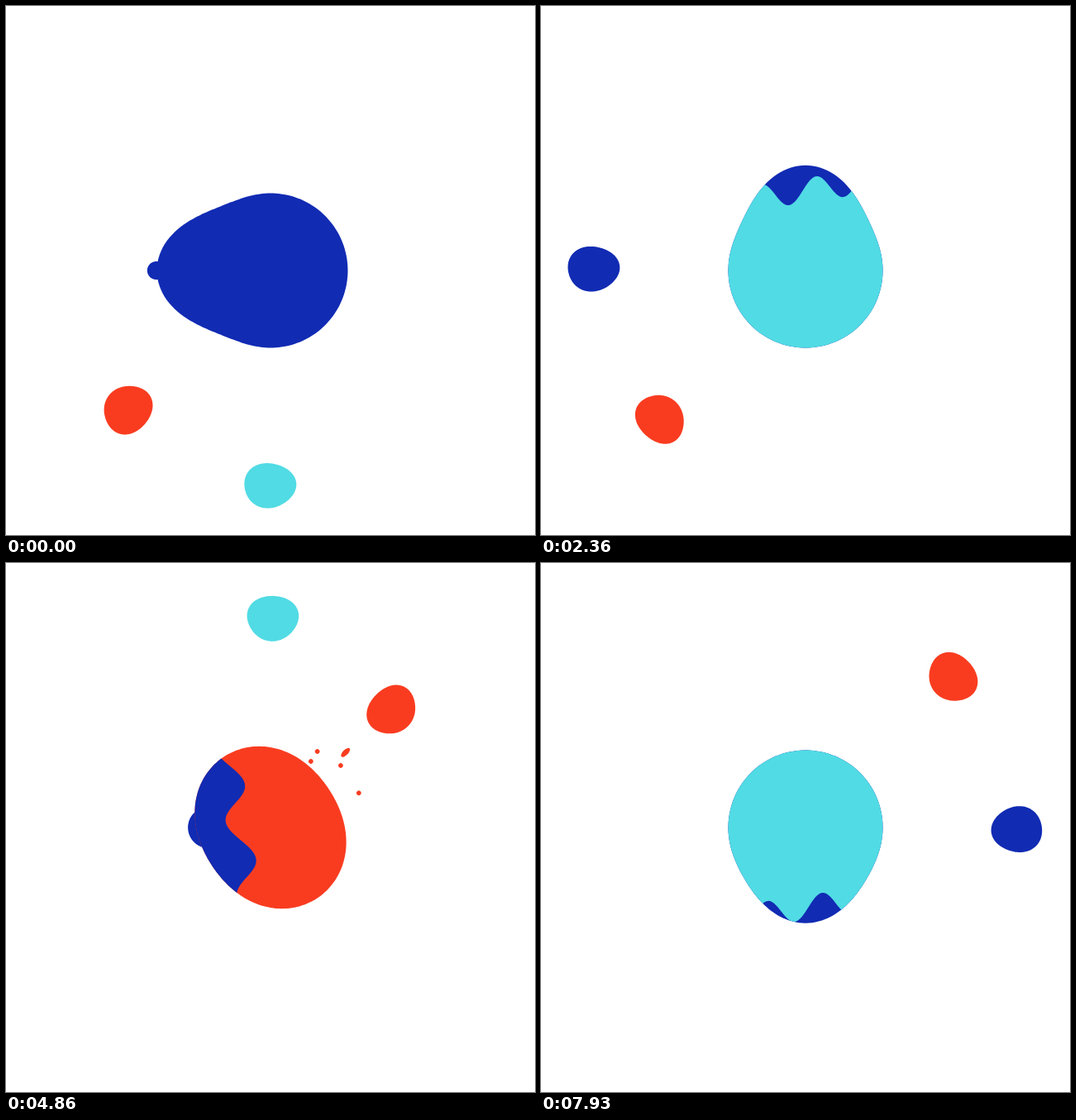
An HTML page with a canvas for the animation above (8 s loop, 640 by 640 pixels).

```html
<!DOCTYPE html>
<html lang="en">
<head>
<meta charset="utf-8">
<title>Drops</title>
<style>
  html, body { margin: 0; width: 100%; height: 100%; overflow: hidden; background: #fff; }
  canvas { display: block; width: 100%; height: 100%; }
</style>
</head>
<body>
<canvas id="stage" width="640" height="640"></canvas>
<script>
const ctx = document.getElementById('stage').getContext('2d');
const { PI, sin, cos, exp, max, min, floor } = Math;
const TAU = PI * 2;
const LOOP = 8000, RADIUS = 93.5;

// A drop crosses the body once per pass, in alternating directions.
// Ages are in ms since it reached the body.
const PASS = 5640, LEAD = 60, SUNK = 170, EXIT = 820, DETACH = 1200, RETURN = 4250, FILLED = 520;

const DROPS = [
  { color: '#51dbe4', arrive: 2000, angle: -PI / 2, sprayLead: 100 },
  { color: '#f93c20', arrive: 3430, angle: -PI / 4, sprayLead: 0 },
  { color: '#112bb3', arrive: 4820, angle: 0, sprayLead: 0 }
];

// Places of the small splashes, along and across the path.
const SPLASHES = [[105, -25], [91, -22], [113, 7], [105, 46], [76, 19]];

const mix = (a, b, x) => a + (b - a) * x;
const clamp = x => max(0, min(1, x));

function smooth(from, to, t) {
  const x = clamp((t - from) / (to - from));
  return x * x * (3 - 2 * x);
}

// Sinks in steadily, is thrown out and slows down, drifts back and snaps in.
function distance(age) {
  if (age < SUNK) return -88 + 0.32 * age;
  const back = clamp((age - RETURN) / (PASS - RETURN));
  return 264 - 126 * exp((EXIT - age) / 820) - 95 * back ** 1.45 - 80 * back ** 8;
}

function dropShape(age) {
  if (age < SUNK) return { size: 25, stretch: 0, lobes: 0, turn: 0, sway: 0 };
  const free = smooth(1100, 1400, age) * (1 - smooth(5100, 5580, age));
  const turn = PI / 2 - PI * clamp((age - 1400) / 3390) ** 2.3;
  return {
    size: mix(11, 29.3, smooth(EXIT, 1150, age)) - 4 * smooth(5000, 5580, age),
    stretch: 2.2 * free * cos((age - 1430) / 900 * TAU),
    lobes: 0.032 * free,
    turn,
    sway: 3 * free * sin(turn)
  };
}

const bulge = age => 44 * smooth(100, 480, age) * (1 - smooth(1000, 1350, age));
const squash = age => 9 * smooth(950, 1400, age) * (1 - smooth(1500, 2000, age));

function stateAt(drop, time) {
  const pass = floor((time - drop.arrive + LEAD) / PASS);
  return {
    ...drop,
    age: time - drop.arrive - pass * PASS,
    heading: drop.angle + (pass % 2 ? PI : 0)
  };
}

// Draws with x along the drop's path and y across it.
function along(drop, ...parts) {
  ctx.save();
  ctx.rotate(drop.heading);
  ctx.fillStyle = drop.color;
  parts.forEach(draw => draw(drop));
  ctx.restore();
}

function fillOutline(pointAt) {
  ctx.beginPath();
  for (let i = 0; i < 180; i++) ctx.lineTo(...pointAt(i / 180 * TAU));
  ctx.closePath();
  ctx.fill();
}

function fillOval(x, y, rx, ry) {
  ctx.beginPath();
  ctx.ellipse(x, y, rx, ry, 0, 0, TAU);
  ctx.fill();
}

function drawSpray({ age, sprayLead }) {
  const t = age + sprayLead - 1430;
  if (t < -230 || t > 650) return;
  const slowing = exp(-t / 140);
  const tail = 7 * (1 - smooth(100, 700, t));
  fillOval(165 - 37 * slowing, 0, tail, tail * 0.45);
  for (const [x, y] of SPLASHES) {
    const r = 2.8 * clamp(1 - t / (17 * (125 - x)));
    fillOval(x + 16 * (1 - slowing), y, r, r);
  }
}

function drawNeck({ age }) {
  if (age < EXIT || age > DETACH) return;
  const x = distance(age), y = dropShape(age).size * 0.8;
  const waist = 14 * (DETACH - age) / (DETACH - EXIT), middle = x / 2 + 50;
  ctx.beginPath();
  ctx.moveTo(75, -30);
  ctx.quadraticCurveTo(middle, -waist, x, -y);
  ctx.lineTo(x, y);
  ctx.quadraticCurveTo(middle, waist, 75, 30);
  ctx.fill();
}

function drawDrop({ age }) {
  if (age > SUNK && age < EXIT - 40) return;
  const { size, stretch, lobes, turn, sway } = dropShape(age);
  const x = distance(age);
  fillOutline(a => {
    const k = 1 + lobes * cos(3 * (a - turn));
    return [x + (size + stretch) * k * cos(a), sway + (size - stretch) * k * sin(a)];
  });
}

function drawBody(drops) {
  const [latest, previous] = [...drops].sort((a, b) => a.age - b.age);
  const filling = latest.age < FILLED;
  const radius = a => drops.reduce((r, { age, heading }) => {
    const b = a - heading;
    return r + bulge(age) * max(0, cos(b)) ** 4.5 - squash(age) * cos(2 * b - 0.4);
  }, RADIUS);
  ctx.save();
  ctx.fillStyle = filling ? previous.color : latest.color;
  fillOutline(a => [radius(a) * cos(a), radius(a) * sin(a)]);
  if (filling) {
    ctx.clip();
    along(latest, drawFront);
  }
  ctx.restore();
}

// The wavy edge of the new colour: rushes across, waits near the tip, then fills it.
function drawFront({ age }) {
  const edge = min(97, -73 + 0.85 * age) + 80 * smooth(380, FILLED, age);
  const height = 15 * smooth(0, 40, age), settled = smooth(40, 290, age);
  const wave = mix(90, 66, settled), shift = mix(38, 13, settled);
  ctx.beginPath();
  ctx.moveTo(-200, -150);
  for (let y = -150; y <= 150; y += 2) {
    ctx.lineTo(edge + 0.15 * y + height * cos((y - shift) / wave * TAU), y);
  }
  ctx.lineTo(-200, 150);
  ctx.fill();
}

function render(time) {
  const drops = DROPS.map(drop => stateAt(drop, time));
  ctx.fillStyle = '#fff';
  ctx.fillRect(0, 0, 640, 640);
  ctx.save();
  ctx.translate(320, 320);
  drops.forEach(drop => along(drop, drawSpray, drawNeck, drawDrop));
  drawBody(drops);
  ctx.restore();
}

function tick() {
  render(performance.now() % LOOP);
  requestAnimationFrame(tick);
}
tick();
</script>
</body>
</html>
```
